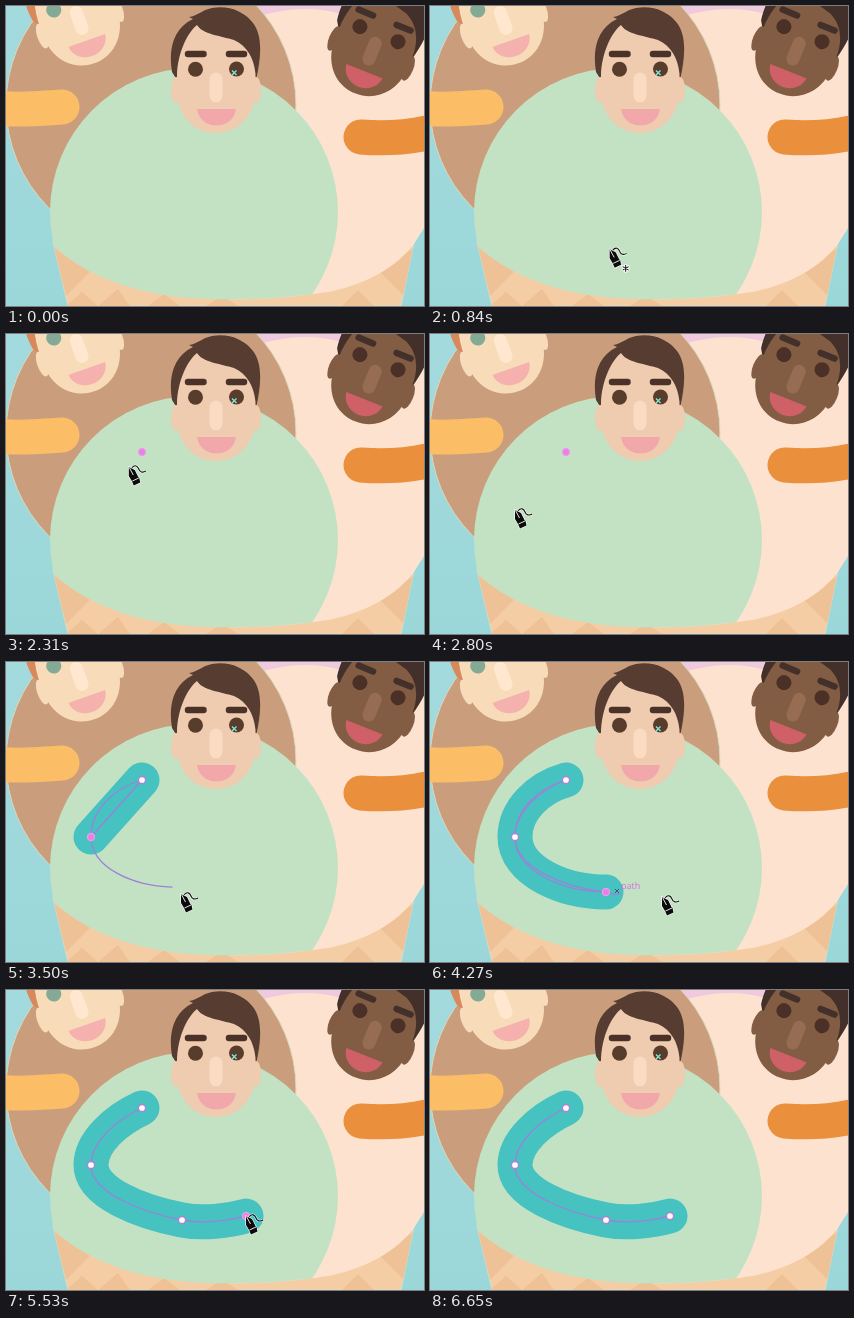
An HTML page that plays this animation: 418x300 px, repeating every 6860 ms.

```html
<!DOCTYPE html>
<html lang="en">
<head>
<meta charset="utf-8">
<title>Drawing an arm</title>
<style>
  html, body { margin: 0; width: 100%; height: 100%; overflow: hidden; background: #a0d9df; }
  svg { display: block; width: 418px; height: 300px; }
  .arm { fill: none; stroke-width: 35; stroke-linecap: round; }
  .line { fill: none; stroke: #9b82d8; stroke-width: 1.3; }
  .dot { stroke-width: 1.3; }
  .label { font: 9px "Open Sans", Arial, sans-serif; fill: #d66fdc; }

  .skin { fill: var(--skin); }
  .hair { fill: var(--hair); }
  .eye { fill: var(--eye); }
  .mouth { fill: var(--mouth); }
  .brow { stroke: var(--brow); stroke-width: 6.5; stroke-linecap: round; }
  .nose { stroke: var(--nose); stroke-width: 13; stroke-linecap: round; }
  .mid { --skin: #efcbb0; --hair: #573c32; --brow: #4b3229; --eye: #593d2c; --nose: #fbdcc2; --mouth: #f2a7aa; }
  .left { --skin: #f8dcb9; --hair: #d9885c; --brow: #c9764c; --eye: #84aa95; --nose: #ffe8cf; --mouth: #f5b1ae; }
  .right { --skin: #835d43; --hair: #43302b; --brow: #43302b; --eye: #4a3026; --nose: #966c52; --mouth: #cf6068; }
</style>
</head>
<body>
<svg viewBox="0 0 418 300">
  <defs>
    <linearGradient id="sky" x1="0" y1="0" x2="0" y2="1">
      <stop offset="0" stop-color="#a3dadd"/>
      <stop offset="1" stop-color="#9bd7d9"/>
    </linearGradient>
    <clipPath id="bowl">
      <path d="M0 0H418V222L408 238C385 268 345 284 308 288C270 293 235 294 200 293C145 291 88 277 46 239L0 206Z"/>
    </clipPath>
    <clipPath id="cone"><path d="M47 236H408L395 300H62Z"/></clipPath>

    <!-- a head, with the point between the eyes at 0,0 -->
    <g id="head">
      <path class="hair" d="M-44 3C-48-21-42-41-23-50L-27-52C-19-53-14-59-4-61C12-64 28-58 37-46C46-34 46-15 40 11H-39Z"/>
      <ellipse class="skin" cx="-40" cy="21" rx="5" ry="13"/>
      <ellipse class="skin" cx="40" cy="21" rx="5" ry="13"/>
      <path class="skin" d="M-39 5C-38-15-30-35-19-44C-14-35 5-33 18-29C31-23 38-11 39.500 5V25C37 48 21 64 0 64C-21 64-37 48-39 25Z"/>
      <path class="brow" d="M-28-15H-12.500M13-15H28"/>
      <circle class="eye" cx="-20.500" cy=".3" r="7.500"/>
      <circle class="eye" cx="20.500" cy="0" r="7.500"/>
      <path class="nose" d="M0 10V27"/>
      <path class="mouth" d="M-19 40H20C17 62-16 62-19 40Z"/>
    </g>
  </defs>

  <rect width="418" height="300" fill="url(#sky)"/>
  <path d="M47 236H408L395 300H62Z" fill="#f5cda4" stroke="#d6dfc8"/>
  <g clip-path="url(#cone)" fill="#efc196">
    <path d="M46 240L84 266L60 290ZM60 300L76 286L92 300ZM92 300L112 283L124 300ZM142 300L158 288L174 300ZM200 300L216 290L232 300ZM336 300L352 284L368 300ZM410 240L374 266L398 290Z"/>
  </g>

  <g clip-path="url(#bowl)">
    <path d="M220 0H340V14H220Z" fill="#efc9dd"/>
    <path d="M225 20Q290-7 338 9L372 0H418V300H225Z" fill="#fde2d0"/>
    <circle cx="145" cy="99" r="145" fill="#ca9e7c" stroke="#d9d9c0"/>
    <circle cx="188" cy="206" r="144" fill="#c3e2c4"/>
  </g>

  <path class="arm" stroke="#fbbd66" d="M-8 102C15 105 35 102 56 101"/>
  <path class="arm" stroke="#ea8f3c" d="M355 131C378 133 400 132 426 126"/>

  <use href="#head" class="left" transform="translate(67 -3) rotate(-19.400)"/>
  <use href="#head" class="right" transform="translate(373 28) rotate(22)"/>
  <use href="#head" class="mid" transform="translate(210 63)"/>
  <path d="M226 64.500L230.500 69M230.500 64.500L226 69" stroke="#7de9df" stroke-width="1.300"/>

  <path id="arm" class="arm" stroke="#46c2c0"/>
  <path id="spine" class="line"/>
  <path id="preview" class="line"/>
  <g id="dots"></g>
  <g id="hint">
    <path d="M185 227L189 231M189 227L185 231" stroke="#4a5562"/>
    <text class="label" x="191" y="227">path</text>
  </g>

  <g id="pen">
    <path id="squiggle" d="M3 1C6-3 9-1 10 2S14 6 17 4" fill="none" stroke="#fff" stroke-width="2.600" opacity=".7"/>
    <use href="#squiggle" style="display:none"/>
    <path d="M3 1C6-3 9-1 10 2S14 6 17 4" fill="none" stroke="#111" stroke-width="1.100"/>
    <path d="M0 0L6 3L9.500 10L10.500 11L11.500 15.500L5 18.500L3 14L0 9Z" fill="#0c0c0c" stroke="#fff" stroke-width="1.200" paint-order="stroke"/>
    <path d="M.5 .5L4.500 8M3.500 14L10 11" stroke="#fff" stroke-width=".9"/>
    <g id="star" fill="none" stroke-linecap="round">
      <path d="M16 16V22M13.400 17.500L18.600 20.500M18.600 17.500L13.400 20.500" stroke="#fff" stroke-width="3"/>
      <path d="M16 16V22M13.400 17.500L18.600 20.500M18.600 17.500L13.400 20.500" stroke="#222" stroke-width="1.100"/>
    </g>
  </g>
</svg>
<script>
const LOOP = 6860, STEP = 70, LAG = 140;
const $ = id => document.getElementById(id);
const points = [[136, 118], [85, 175], [176, 230], [240, 226]];
const clicks = [2030, 2940, 3780, 4620];
const DESELECT = 6300;

// time, x, y of the pen tip
const track = [
  [560, 205, 312], [1260, 133, 117], [1890, 133, 117], [2030, 136, 118], [2100, 136, 118],
  [2730, 85, 176], [3010, 85, 176], [3430, 173, 229], [3500, 175, 232], [3640, 176, 230],
  [4060, 176, 230], [4270, 232, 235], [4480, 240, 226], [5880, 240, 226], [6160, 330, 312]
];

// control points of the first two segments as the curve grows
const straight = [119, 137, 102, 156];
const bent = [108, 126, 85, 148, 85, 209, 133, 230];
const relaxed = [110, 130, 85, 152, 85, 203, 135, 222];

const mix = (a, b, k) => a.map((v, i) => v + (b[i] - v) * k);
const curve = (c, p) => `C${c.join(" ")} ${p.join(" ")}`;
const start = "M" + points[0].join(" ");
const show = (el, on) => el.style.display = on ? "" : "none";

function tip(t) {
  const i = track.findIndex(k => k[0] > t);
  if (i === 0) return track[0].slice(1);
  if (i < 0) return track[track.length - 1].slice(1);
  const a = track[i - 1], b = track[i];
  const u = (t - a[0]) / (b[0] - a[0]);
  return mix(a.slice(1), b.slice(1), u * u * (3 - 2 * u));
}

function twoSegments(c) {
  return start + curve(c.slice(0, 4), points[1]) + curve(c.slice(4), points[2]);
}

function armPath(count) {
  if (count < 2) return "";
  if (count === 2) return start + "L" + points[1].join(" ");
  if (count === 3) return twoSegments(bent);
  return twoSegments(relaxed) + curve([197, 234, 222, 231], points[3]);
}

function previewPath(t, count) {
  const p = tip(t - LAG), [x, y] = p;
  if (count === 2 && t > 3080) {
    const k = Math.min(1, Math.hypot(x - 85, y - 175) / 60);
    return start + curve(mix(straight, bent.slice(0, 4), k), points[1]) +
      curve([85, 175 + (y - 175) * .6, x - (x - 85) * .5, y - 1], p);
  }
  if (count === 3 && t > 4060) {
    const k = Math.min(1, .4 + Math.hypot(x - 176, y - 230) / 100);
    return twoSegments(mix(bent, relaxed, k)) +
      curve([176 + (x - 176) * .33, 230 + 4 * k, x - (x - 176) * .28, y + 4 * k], p);
  }
  return "";
}

const dots = points.map(([x, y]) => {
  const c = document.createElementNS("http://www.w3.org/2000/svg", "circle");
  c.setAttribute("class", "dot");
  c.setAttribute("cx", x);
  c.setAttribute("cy", y);
  c.setAttribute("r", 3.5);
  $("dots").append(c);
  return c;
});

function draw(t) {
  const count = clicks.filter(c => c <= t).length;
  const d = armPath(count);
  $("arm").setAttribute("d", d);
  $("spine").setAttribute("d", d);
  $("preview").setAttribute("d", previewPath(t, count));
  dots.forEach((dot, i) => {
    const active = i === count - 1 && t < DESELECT;
    show(dot, i < count);
    dot.setAttribute("fill", active ? "#ee7bea" : "#fff");
    dot.setAttribute("stroke", active ? "#e6a0e4" : "#b07fd8");
  });
  show($("hint"), t >= 4130 && t < 4410);
  show($("pen"), t >= 560 && t < 6160);
  show($("star"), t < clicks[0]);
  $("pen").setAttribute("transform", `translate(${tip(t).join(" ")})`);
}

const begin = performance.now();
function tick() {
  const t = (performance.now() - begin) % LOOP;
  draw(Math.floor(t / STEP) * STEP);
  requestAnimationFrame(tick);
}
tick();
</script>
</body>
</html>
```
